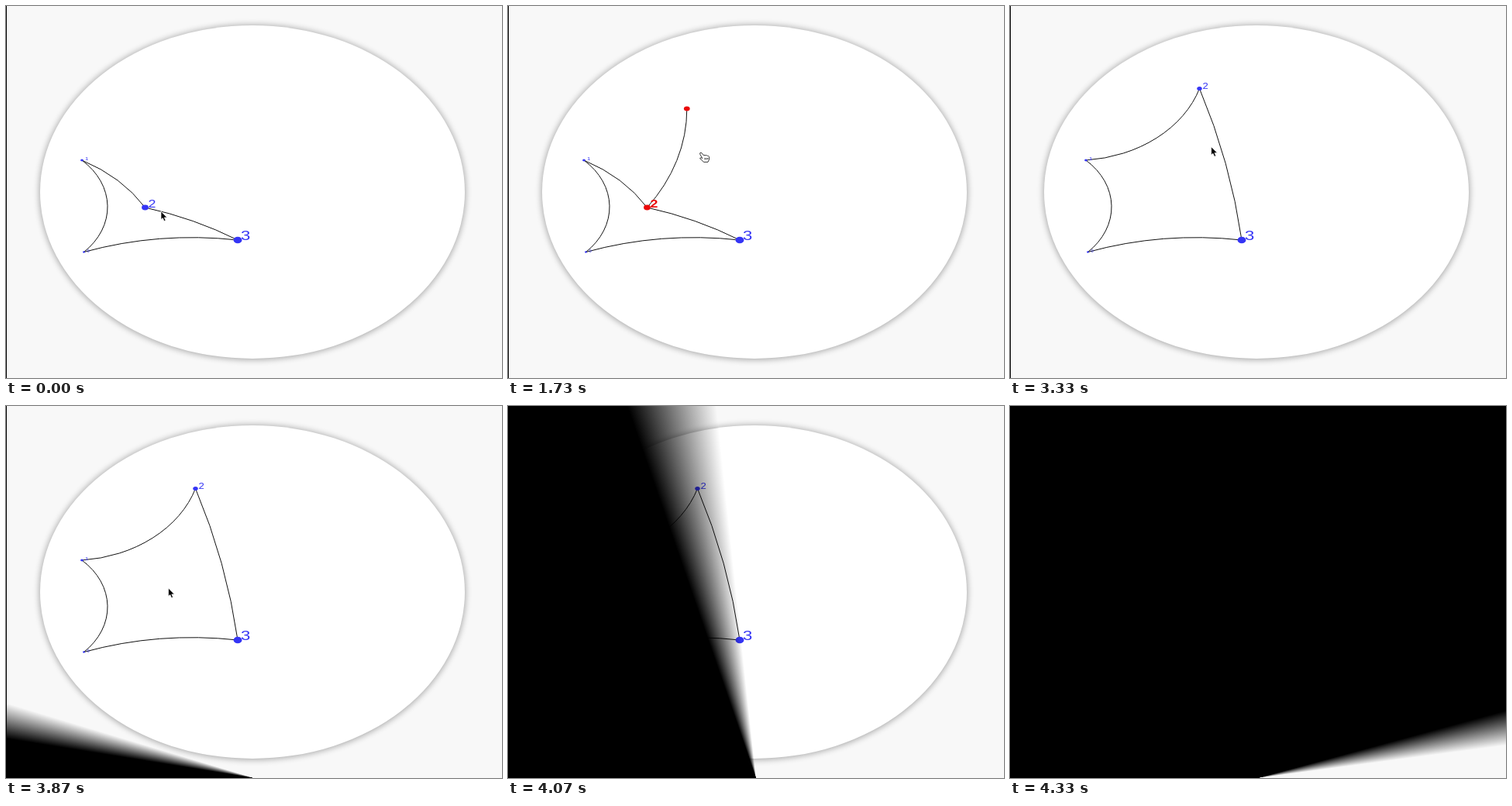
Recreate the animation shown at these times as an HTML page. Size 640 by 480 pixels, loop 4400 ms.

```html
<!DOCTYPE html>
<html lang="en">
<head>
<meta charset="utf-8">
<title>Hyperbolic polygon</title>
<style>
  html, body { margin: 0; width: 100%; height: 100%; overflow: hidden; background: #f8f8f8; }
  svg { position: absolute; left: 0; top: 0; width: 640px; height: 480px; }
  text { font-family: "Liberation Sans", Arial, sans-serif; }
  #wipe { position: absolute; left: 0; top: 0; width: 480px; height: 480px;
          transform: scaleX(1.33333); transform-origin: 0 0; }
</style>
</head>
<body>
<svg viewBox="0 0 640 480">
  <defs>
    <filter id="soft" x="-10%" y="-10%" width="120%" height="120%">
      <feGaussianBlur stdDeviation="4"/>
    </filter>
  </defs>
  <rect width="640" height="480" fill="#f8f8f8"/>
  <ellipse cx="318" cy="240.5" rx="274.5" ry="215.5" opacity=".36" filter="url(#soft)"/>
  <ellipse cx="318" cy="240" rx="274" ry="215" fill="#fff"/>
  <rect width="1" height="480"/>
  <path id="lines" fill="none" stroke="#111" stroke-width="1"/>
  <g id="points"></g>
  <path id="arrow" d="M0 0V10.5L2.3 8.6 4 12.5 6 11.7 4.3 7.9H7.8Z" stroke="#fff" stroke-width=".7"/>
  <path id="hand" d="M.9 1.2Q2.2 0 3.4 1.4L6 4.4Q7.2 3.4 8.4 4.3Q9.6 3.6 10.6 4.8Q12 4.4 12.8 6.2L12.7 9.6 11.2 12.8H5.6L3.9 10.8.8 8.3Q1 6.9 2.6 7.3L4 8 1 2.8ZM7.2 7.4V9.8M9.1 7.4V9.8M10.9 7.4V9.4"
        fill="#fff" stroke="#222" stroke-width=".9" stroke-linejoin="round"/>
</svg>
<div id="wipe"></div>
<script>
const LOOP = 4400, CX = 318, CY = 240, RX = 274, RY = 215;
const BLUE = '#3535f5', RED = '#ea0808';
const CORNERS = [[100.5, 317.5], [98, 199], [179.5, 260], [299, 302]];
const DROP = [244.5, 106.5];
const $ = id => document.getElementById(id);

const clamp = v => Math.max(0, Math.min(1, v));
const ease = v => v * v * (3 - 2 * v);
const mix = (a, b, p) => a.map((v, i) => v + (b[i] - v) * p);
const toDisk = ([x, y]) => [(x - CX) / RX, (y - CY) / RY];
const depth = p => { const [u, v] = toDisk(p); return 1 - u * u - v * v; };

// Poincaré geodesic: arc of the circle orthogonal to the disk's rim
function geodesic(a, b) {
  const [ax, ay] = toDisk(a), [bx, by] = toDisk(b);
  const det = ax * by - ay * bx;
  let arc = `L${b}`;
  if (Math.abs(det) > 1e-6) {
    const ka = (ax * ax + ay * ay + 1) / 2, kb = (bx * bx + by * by + 1) / 2;
    const cx = (ka * by - ay * kb) / det, cy = (ax * kb - ka * bx) / det;
    const r = Math.sqrt(cx * cx + cy * cy - 1);
    const sweep = (ax - cx) * (by - cy) - (ay - cy) * (bx - cx) > 0 ? 1 : 0;
    arc = `A${RX * r} ${RY * r} 0 0 ${sweep} ${b}`;
  }
  return `M${a}${arc}`;
}

function point(p, label, hot) {
  const d = depth(p), color = hot ? RED : BLUE;
  const text = label === '' ? '' :
    `<text x="3.2" y=".4" font-size="${19 * d}" font-weight="${hot ? 700 : 400}">${label}</text>`;
  return `<g transform="translate(${p}) scale(${RX / RY} 1)" fill="${color}">` +
    `<circle r="${4.7 * d}"/>${text}</g>`;
}

function place(el, pos, shown) {
  el.setAttribute('transform', `translate(${pos})`);
  el.style.display = shown ? '' : 'none';
}

function render(t) {
  const k = Math.floor((t + 4) * 0.015);   // 15 steps per second
  const span = (from, to) => clamp((k - from) / (to - from));
  const hot = k >= 15 && k < 42, dragging = k >= 22 && k < 42, dropped = k >= 42;
  const pull = ease(span(21, 28)), settle = span(31, 39);

  const corners = CORNERS.slice();
  if (dropped) corners[2] = DROP;
  let lines = corners.map((p, i) => geodesic(p, corners[(i + 1) % 4])).join('');
  let dots = corners.map((p, i) => point(p, i, hot && i === 2)).join('');
  if (dragging) {
    const tip = mix(mix(CORNERS[2], [243.5, 101], pull), DROP, settle);
    lines += geodesic(CORNERS[2], tip);
    dots += point(tip, '', true);
  }
  $('lines').setAttribute('d', lines);
  $('points').innerHTML = dots;

  const hover = mix([181, 260], [177.3, 257.5], span(3, 7));
  const hand = mix(mix(hover, [264, 171.5], pull), [263.2, 175.5], settle);
  const arrow = dropped
    ? mix([265.5, 175.5], [209.5, 235], ease(span(49, 54)))
    : mix([200, 265], [182, 260.5], span(0, 2));
  const pointing = k >= 2 && !dropped;
  place($('hand'), hand, pointing);
  place($('arrow'), arrow, !pointing);

  const mid = 17 + 21.15 * (k - 58);
  $('wipe').style.background = k < 58 ? 'none' :
    `conic-gradient(from 270deg at 50% 100%, #000 ${mid - 5}deg, rgba(0,0,0,0) ${mid + 5}deg)`;
}

const start = performance.now();
function tick() {
  render((performance.now() - start) % LOOP);
  requestAnimationFrame(tick);
}
tick();
</script>
</body>
</html>
```
